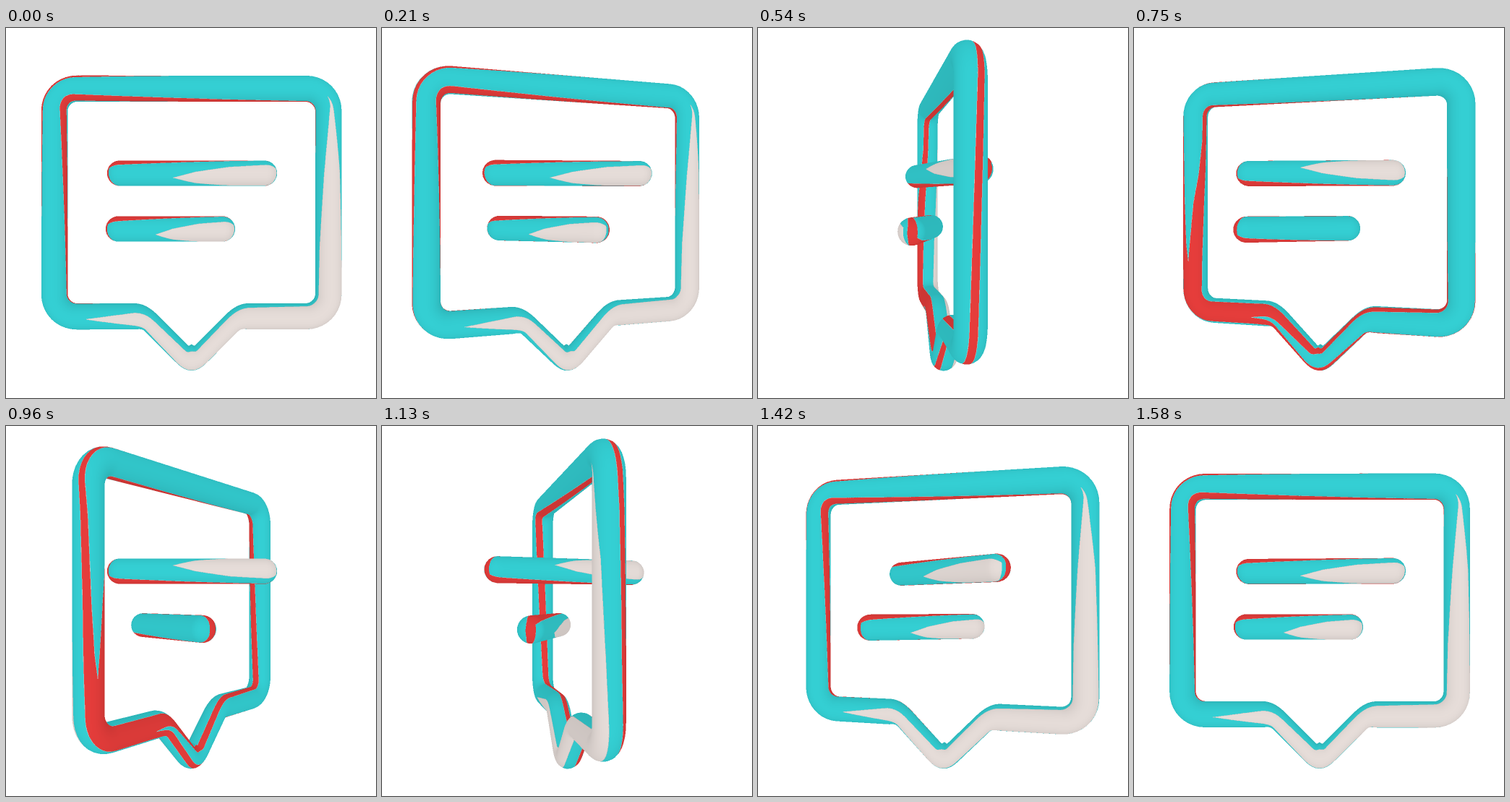
Recreate the animation shown at these times as an HTML page with a canvas. Size 512 px wide and 512 px high, loop 1620 ms.

```html
<!DOCTYPE html>
<html lang="en">
<head>
<meta charset="utf-8">
<title>Turning speech bubble</title>
<style>
html, body { margin: 0; width: 100%; height: 100%; overflow: hidden; background: #fff; }
canvas { display: block; width: 512px; height: 512px; }
</style>
</head>
<body>
<canvas id="stage" width="512" height="512"></canvas>
<script>
const LOOP = 1620, STEP = 1000 / 24, LAST = 38;
const SIZE = 512, SS = 2, BIG = SIZE * SS;
const CX = 256.75, CY = 243, DIST = 744;
const R = 17.7, SIDES = 32, TU = 1600, TV = 720;
const RAD = Math.PI / 180;
const TEAL = 0, RED = 1, PALE = 2, SEAM = 3;
const COLORS = [[52, 206, 210], [228, 61, 59], [228, 219, 215], [196, 194, 192]];

const ctx = document.getElementById('stage').getContext('2d');
const big = document.createElement('canvas');
big.width = big.height = BIG;
const bigCtx = big.getContext('2d');
const image = bigCtx.createImageData(BIG, BIG);
const pixels = new Uint32Array(image.data.buffer);
const depth = new Float32Array(BIG * BIG);

const mix = (a, b, t) => a + (b - a) * t;
const smooth = t => { t = Math.min(1, Math.max(0, t)); return t * t * (3 - 2 * t); };
const within = (a, band) => band && (((a - band[0]) % 360) + 360) % 360 < band[1] - band[0];

// Band limits in degrees, interpolated between [position, low, high] keys.
function bandAt(keys, p) {
  for (let i = 1; i < keys.length; i++) {
    const a = keys[i - 1], b = keys[i];
    if (p >= a[0] && p <= b[0]) {
      const t = (p - a[0]) / (b[0] - a[0]);
      return [mix(a[1], b[1], t), mix(a[2], b[2], t)];
    }
  }
  return null;
}

// Texture of colour indices; rule(u) returns a function of the angle in degrees.
function paint(rule) {
  const raw = new Uint8Array(TU * TV), tex = new Uint8Array(TU * TV);
  for (let i = 0; i < TU; i++) {
    const at = rule((i + 0.5) / TU), row = i * TV;
    for (let j = 0; j < TV; j++) raw[row + j] = at(j * 360 / TV);
    for (let j = 0; j < TV; j++) {
      const a = raw[row + (j + TV - 1) % TV], b = raw[row + (j + 2) % TV];
      tex[row + j] = a === b ? raw[row + j] : SEAM;
    }
  }
  return tex;
}

// Frame: positions 0..4 run clockwise from the top left corner.
const OUTER = [[0, 16, 46], [1.05, -32, -8], [1.21, -46, -19], [1.5, -58, -27], [1.69, -70, -30],
  [1.77, -82, -32], [2, -80, -40], [2.25, -80, -42], [2.5, -55, -22], [2.67, -32, -12], [3, -18, 12], [4, 16, 46]];
const INNER = [[0, 122, 165], [1, 176, 205], [1.21, 182, 210], [1.37, 190, 228], [1.5, 199, 252],
  [1.77, 210, 278], [2, 214, 281], [2.25, 212, 280], [2.5, 205, 240], [2.67, 195, 225], [3, 175, 208], [4, 122, 165]];
const LENS = [[1.03, 91, 91], [1.37, 46, 122], [1.69, 28, 145], [2, 13, 155], [2.33, 20, 140],
  [2.5, 30, 132], [2.67, 52, 122], [2.879, 89, 89]];

function frameRule(u) {
  const q = u * 4, outer = bandAt(OUTER, q), inner = bandAt(INNER, q), lens = bandAt(LENS, q);
  return a => within(a, lens) ? PALE : within(a, outer) || within(a, inner) ? RED : TEAL;
}

// Rounded centre line: [x, y, tx, ty, position]
function framePath() {
  const corners = [
    [-189.5, 84, 31, 0], [189.5, 84, 31, 1], [189.5, 399, 31, 2], [65, 399, 34, 2.33],
    [0, 464, 20, 2.5], [-65, 399, 34, 2.67], [-189.5, 399, 31, 3]
  ];
  const n = corners.length, out = [];
  const line = (a, b) => {
    const steps = Math.ceil(Math.hypot(b[0] - a[0], b[1] - a[1]) / 12);
    for (let k = 1; k < steps; k++) {
      const t = k / steps;
      out.push([mix(a[0], b[0], t), mix(a[1], b[1], t), a[2], a[3], mix(a[4], b[4], t)]);
    }
  };
  corners.forEach(([x, y, r, q], i) => {
    const p = corners[(i + n - 1) % n], s = corners[(i + 1) % n];
    const l1 = Math.hypot(x - p[0], y - p[1]), l2 = Math.hypot(s[0] - x, s[1] - y);
    const ax = (x - p[0]) / l1, ay = (y - p[1]) / l1, bx = (s[0] - x) / l2, by = (s[1] - y) / l2;
    const turn = Math.acos(ax * bx + ay * by), t = r * Math.tan(turn / 2);
    const sign = Math.sign(ax * by - ay * bx), nx = -ay * sign, ny = ax * sign;
    const q0 = q - (q - (i ? p[3] : -1)) * t / l1;
    const q1 = q + ((i === n - 1 ? 4 : s[3]) - q) * t / l2;
    for (let k = 0; k <= 10; k++) {
      const w = turn * k / 10, sw = Math.sin(w), cw = Math.cos(w);
      const pt = [x - ax * t + r * (sw * ax + (1 - cw) * nx), y - ay * t + r * (sw * ay + (1 - cw) * ny),
        cw * ax + sw * nx, cw * ay + sw * ny, mix(q0, q1, k / 10)];
      if (!k && out.length) line(out[out.length - 1], pt);
      out.push(pt);
    }
  });
  const first = out[0].slice();
  first[4] += 4;
  line(out[out.length - 1], first);
  out.push(first);
  return out;
}

// A mesh is a list of rings; each vertex is [x, y, z, nx, nz, u, v].
function frameMesh() {
  return framePath().map(([x, y, tx, ty, q]) => {
    const r = y > 399.01 ? R * (1 - 0.22 * (2 * tx * ty) ** 2) : R;
    return Array.from({ length: SIDES + 1 }, (_, j) => {
      const a = j / SIDES * 2 * Math.PI, c = Math.cos(a), s = Math.sin(a);
      return [x + ty * c * r, y - tx * c * r - CY, s * R, c * ty, s, q / 4, j / SIDES];
    });
  });
}

// Bars: capsule profile by arc length from the left pole to the right one.
function profile(u, half) {
  const cap = R * Math.PI / 2, total = 2 * half + 2 * cap, l = u * total;
  if (l < cap) return { x: -half - R * Math.cos(l / R), w: Math.sin(l / R), nx: -Math.cos(l / R) };
  if (l > total - cap) {
    const b = (total - l) / R;
    return { x: half + R * Math.cos(b), w: Math.sin(b), nx: Math.cos(b) };
  }
  return { x: l - cap - half, w: 1, nx: 0 };
}

const BAR_LENS = [[0.39, 113, 113], [0.52, 87, 142], [0.72, 64, 165], [0.94, 53, 167], [1, 53, 167]];

function barRule(half, twoLenses) {
  return u => {
    const { x, w, nx } = profile(u, half);
    const p = (x + half + R) / (2 * (half + R));
    const isRed = (p, nx, a) => {
      if (within(a, [-8, 56 - 46 * p])) return true;
      const d = Math.atan2(w * Math.sin(a * RAD), -nx) / RAD;
      return nx < 0 && d > -6 && d < 36;
    };
    const isPale = (p, nx, a) => within(a, bandAt(BAR_LENS, p)) &&
      (nx <= 0 || Math.atan2(w * Math.sin(a * RAD), nx) > 25 * RAD);
    return a => {
      if (isRed(p, nx, a) || isRed(1 - p, -nx, a + 180)) return RED;
      if (isPale(p, nx, a) || (twoLenses && isPale(1 - p, -nx, a + 180))) return PALE;
      return TEAL;
    };
  };
}

function barMesh(half, y) {
  const rings = 48;
  return Array.from({ length: rings + 1 }, (_, i) => {
    const u = i / rings, { x, w, nx } = profile(u, half);
    return Array.from({ length: SIDES + 1 }, (_, j) => {
      const a = j / SIDES * 2 * Math.PI, c = Math.cos(a), s = Math.sin(a);
      return [x, y - CY - c * w * R, s * w * R, nx, s * w, u, j / SIDES];
    });
  });
}

function fill(a, b, c, tex) {
  const area = (b.x - a.x) * (c.y - a.y) - (b.y - a.y) * (c.x - a.x);
  if (Math.abs(area) < 1e-6) return;
  const x0 = Math.max(0, Math.ceil(Math.min(a.x, b.x, c.x) - 0.5));
  const x1 = Math.min(BIG - 1, Math.floor(Math.max(a.x, b.x, c.x) - 0.5));
  const y0 = Math.max(0, Math.ceil(Math.min(a.y, b.y, c.y) - 0.5));
  const y1 = Math.min(BIG - 1, Math.floor(Math.max(a.y, b.y, c.y) - 0.5));
  for (let y = y0; y <= y1; y++) {
    for (let x = x0; x <= x1; x++) {
      const px = x + 0.5, py = y + 0.5;
      const wb = ((px - a.x) * (c.y - a.y) - (py - a.y) * (c.x - a.x)) / area;
      const wc = ((b.x - a.x) * (py - a.y) - (b.y - a.y) * (px - a.x)) / area;
      const wa = 1 - wb - wc;
      if (wa < -1e-6 || wb < -1e-6 || wc < -1e-6) continue;
      const at = y * BIG + x, near = wa * a.s + wb * b.s + wc * c.s;
      if (near <= depth[at]) continue;
      depth[at] = near;
      const i = (Math.floor((wa * a.u + wb * b.u + wc * c.u) * TU) + TU) % TU;
      const j = (Math.floor((wa * a.v + wb * b.v + wc * c.v) * TV) + TV) % TV;
      const col = COLORS[tex[i * TV + j]];
      const f = 0.88 + 0.13 * Math.max(0, wa * a.lit + wb * b.lit + wc * c.lit);
      pixels[at] = 0xff000000 | (col[2] * f) << 16 | (col[1] * f) << 8 | (col[0] * f);
    }
  }
}

function drawMesh({ mesh, tex, x: shift }, deg) {
  const c = Math.cos(deg * RAD), s = Math.sin(deg * RAD);
  const rings = mesh.map(ring => ring.map(([x, y, z, nx, nz, u, v]) => {
    const k = DIST / (DIST + x * s - z * c);
    return { x: (CX + (x * c + z * s + shift) * k) * SS, y: (CY + y * k) * SS, s: k, u, v, lit: nz * c - nx * s };
  }));
  for (let i = 1; i < rings.length; i++) {
    const p = rings[i - 1], q = rings[i];
    for (let j = 1; j <= SIDES; j++) {
      fill(p[j - 1], p[j], q[j], tex);
      fill(p[j - 1], q[j], q[j - 1], tex);
    }
  }
}

const frame = { mesh: frameMesh(), tex: paint(frameRule), x: 0 };
const longBar = { mesh: barMesh(99.8, 201), tex: paint(barRule(99.8, true)), x: 0.75 };
const shortBar = { mesh: barMesh(71.8, 278), tex: paint(barRule(71.8, false)), x: -29.2 };

function render(k) {
  const turn = 360 * smooth((k + 0.45) / 39.1);
  const flips = 180 * (smooth((k - 3.5) / 16) + smooth((k - 23.5) / 16));
  pixels.fill(0xffffffff);
  depth.fill(0);
  drawMesh(frame, turn);
  drawMesh(longBar, flips);
  drawMesh(shortBar, -turn);
  bigCtx.putImageData(image, 0, 0);
  ctx.drawImage(big, 0, 0, SIZE, SIZE);
}

const start = performance.now();
let shown = -1;
function tick() {
  const t = (performance.now() - start) % LOOP;
  const k = Math.min(LAST, Math.floor((t + 3.4) / STEP));
  if (k !== shown) render(shown = k);
  requestAnimationFrame(tick);
}
tick();
</script>
</body>
</html>
```
